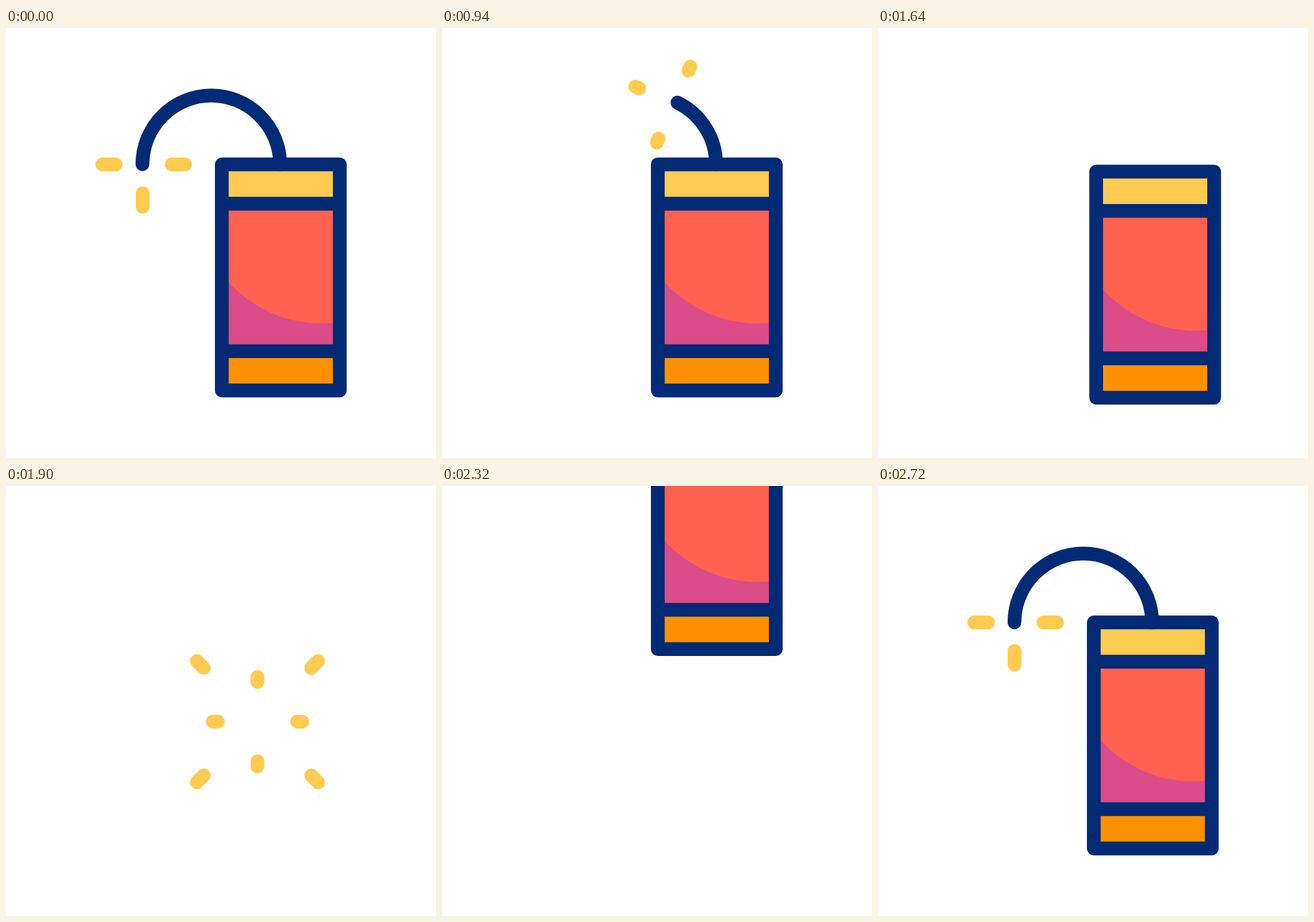
Animation of 640 by 640 pixels, one loop 2.8 s. Source, as an HTML page:

```html
<!DOCTYPE html>
<html lang="en">
<head>
<meta charset="utf-8">
<title>Firecracker</title>
<style>
  html, body { margin: 0; width: 100%; height: 100%; overflow: hidden; background: #fff; }
  svg { display: block; width: 100%; height: 100%; }
  .navy { fill: none; stroke: #032a74; stroke-width: 20.5; stroke-linecap: round; stroke-linejoin: round; }
  .spark { fill: none; stroke: #ffcb50; stroke-width: 20.5; stroke-linecap: round; }
</style>
</head>
<body>
<svg viewBox="0 0 640 640">
  <defs>
    <clipPath id="middle"><rect x="321" y="261" width="176" height="220"/></clipPath>
  </defs>
  <g id="cracker">
    <rect x="321" y="203" width="176" height="59" fill="#ffcb50"/>
    <rect x="321" y="261" width="176" height="220" fill="#db4c88"/>
    <circle cx="470" cy="252" r="187.7" fill="#ff6150" clip-path="url(#middle)"/>
    <rect x="321" y="481" width="176" height="58" fill="#ff9100"/>
    <path class="navy" d="M321.2 203H496.8V539.5H321.2ZM321.2 261.4H496.8M321.2 481H496.8"/>
    <path id="fuse" class="navy"/>
  </g>
  <path id="sparks" class="spark"/>
  <path id="burst" class="spark"/>
</svg>
<script>
  const LOOP = 2800;
  const BURN_END = 1460, BLAST = 1750, BLAST_END = 2167, DROP = 2180, RELIGHT = 2606;
  const PULSE = 114;
  const ARC = { x: 305.5, y: 203, r: 102.4 };

  const [cracker, fuse, sparks, burst] =
    ['cracker', 'fuse', 'sparks', 'burst'].map(id => document.getElementById(id));

  const progress = (t, from, to) => Math.min(1, Math.max(0, (t - from) / (to - from)));
  const show = (el, on) => el.setAttribute('visibility', on ? 'visible' : 'hidden');

  // Part of a ray from (x, y) along (dx, dy), between fractions s and e
  const segment = (x, y, dx, dy, s, e) =>
    `M${x + dx * s} ${y + dy * s}L${x + dx * e} ${y + dy * e}`;

  // Time, x and y of the shake before the blast
  const shake = [[1470, 0, 0], [1580, -22, 23], [1690, 24, 1], [BLAST, 0, 0]];

  function crackerOffset(t) {
    if (t >= DROP) return [0, -560 * (1 - progress(t, DROP, 2480))];
    for (let i = 1; i < shake.length; i++) {
      const [t0, x0, y0] = shake[i - 1], [t1, x1, y1] = shake[i];
      if (t >= t0 && t < t1) {
        const p = progress(t, t0, t1);
        return [x0 + (x1 - x0) * p, y0 + (y1 - y0) * p];
      }
    }
    return [0, 0];
  }

  function drawCracker(t) {
    show(cracker, t < BLAST || t >= DROP);
    cracker.setAttribute('transform', `translate(${crackerOffset(t)})`);

    const burning = t < BURN_END;
    const angle = burning ? Math.PI * t / BURN_END : 0;
    const tipX = ARC.x - ARC.r * Math.cos(angle), tipY = ARC.y - ARC.r * Math.sin(angle);
    fuse.setAttribute('d', burning || t >= DROP
      ? `M${tipX} ${tipY}A${ARC.r} ${ARC.r} 0 0 1 ${ARC.x + ARC.r} ${ARC.y}` : '');
  }

  function sparkTrim(t) {
    if (t >= RELIGHT) return [0, progress(t, RELIGHT, RELIGHT + PULSE)];
    if (t < 65) return [t / 65, 1];
    const u = ((t - 65) / PULSE) % 2;
    return [Math.max(0, u - 1), Math.min(1, u)];
  }

  function drawSparks(t) {
    show(sparks, t < BURN_END || t >= RELIGHT);
    const angle = t < BURN_END ? 180 * progress(t, 12, 1482) : 0;
    const inset = 4.6 * Math.abs(Math.sin(angle * Math.PI / 90));
    const [s, e] = sparkTrim(t);
    sparks.setAttribute('transform', `rotate(${angle} ${ARC.x} ${ARC.y}) translate(${inset} 0)`);
    sparks.setAttribute('d',
      segment(163.6, 203, -20.3, 0, s, e) +
      segment(246.3, 203, 20.3, 0, s, e) +
      segment(203.3, 245.6, 0, 20.4, s, e));
  }

  function drawBurst(t) {
    show(burst, t >= BLAST && t < BLAST_END);
    const s = progress(t, 1767, BLAST_END), e = progress(t, BLAST, 2150);
    let d = '';
    for (let i = 0; i < 8; i++) {
      const reach = i % 2 ? 338 : 176, angle = i * Math.PI / 4;
      d += segment(374.3, 350.7, reach * Math.cos(angle), reach * Math.sin(angle), s, e);
    }
    burst.setAttribute('d', d);
  }

  function draw() {
    const t = performance.now() % LOOP;
    drawCracker(t);
    drawSparks(t);
    drawBurst(t);
    requestAnimationFrame(draw);
  }
  draw();
</script>
</body>
</html>
```
